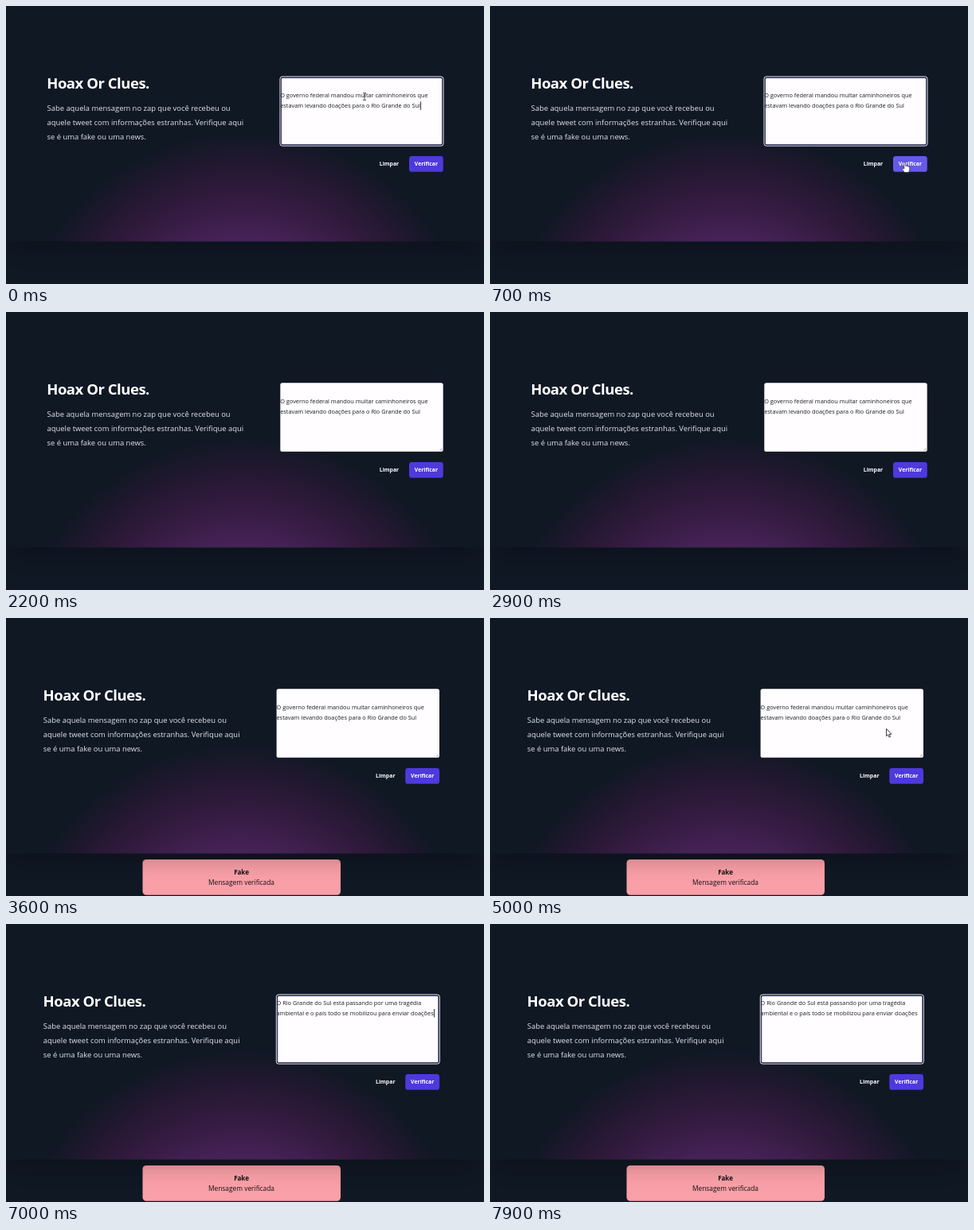
Write an HTML page that moves like this. It is 600x350 px and loops after 8000 ms.

```html
<!DOCTYPE html>
<html lang="pt">
<head>
<meta charset="utf-8">
<title>Verificador de mensagens</title>
<style>
  html, body { margin: 0; height: 100%; overflow: hidden; background: #101824; }
  svg { display: block; width: 600px; height: 350px; font-family: "Open Sans", "Noto Sans", sans-serif; }
  .title { font-size: 18.5px; font-weight: 700; letter-spacing: -.025em; fill: #fff; }
  .lead { font-size: 9.42px; fill: #e2e5ea; }
  .button { font-size: 6.9px; font-weight: 700; fill: #fff; }
  .message { font-size: 7.36px; fill: #1a1d26; }
  .selected { fill: #f4f6ff; }
  .card { font-size: 8.37px; text-anchor: middle; fill: #111; }
  .shadow { filter: blur(14px); opacity: .25; }
</style>
</head>
<body>
<svg viewBox="0 0 600 350">
  <defs>
    <radialGradient id="glow" gradientUnits="userSpaceOnUse" cx="300" cy="446" r="288">
      <stop offset="0" stop-color="#7775d6" stop-opacity=".7"/>
      <stop offset=".5" stop-color="#b13cc4" stop-opacity=".35"/>
      <stop offset=".75" stop-color="#c022a8" stop-opacity=".175"/>
      <stop offset="1" stop-color="#d808a0" stop-opacity="0"/>
    </radialGradient>
    <clipPath id="below"><rect x="-20" y="296.4" width="640" height="54"/></clipPath>
    <clipPath id="selection"><rect/><rect/></clipPath>
  </defs>

  <g id="card" class="card">
    <rect x="171.5" y="304" width="248.5" height="44.7" rx="4.5" fill="#f99fa7"/>
    <text x="295.5" y="323" font-weight="700" font-size="8">Fake</text>
    <text x="295.5" y="336.3">Mensagem verificada</text>
  </g>

  <g id="page">
    <g clip-path="url(#below)"><rect class="shadow" x="7" y="30" width="586" height="274"/></g>
    <path d="M0 150H600V296.4H0z" fill="url(#glow)"/>

    <text class="title" x="51.2" y="104">Hoax Or Clues.</text>
    <g class="lead">
      <text x="51.5" y="132.4">Sabe aquela mensagem no zap que você recebeu ou</text>
      <text x="51.5" y="150.3">aquele tweet com informações estranhas. Verifique aqui</text>
      <text x="51.5" y="168.2">se é uma fake ou uma news.</text>
    </g>

    <g id="idle">
      <rect x="344.3" y="89.2" width="204.4" height="86.6" rx="2.6" fill="#fffdff"/>
      <path d="M544.5 174.5l3-3M546.3 174.7l1.4-1.4" stroke="#777" stroke-width=".6"/>
    </g>
    <g id="focus">
      <rect x="344" y="88.9" width="205" height="87.2" rx="2.8" fill="#111825" stroke="#fff" stroke-width=".9"/>
      <rect x="345.5" y="90.4" width="202" height="84.2" rx="1.6" fill="#fffdff" stroke="#29276b" stroke-width=".8"/>
    </g>

    <g class="message">
      <text x="344.2"></text>
      <text x="344.2"></text>
    </g>
    <g clip-path="url(#selection)">
      <path d="M340 100H550V140H340z" fill="#3c62d2"/>
      <g class="message">
        <text class="selected" x="344.2"></text>
        <text class="selected" x="344.2"></text>
      </g>
    </g>
    <rect id="caret" width=".9" height="10.5" fill="#222"/>

    <text class="button" x="468.8" y="201.4">Limpar</text>
    <rect id="verify" x="506" y="189" width="42.8" height="19.8" rx="3.4"/>
    <text class="button" x="512.8" y="201.4">Verificar</text>
  </g>

  <g id="cursor">
    <path id="beam" d="M-2-4.5h1.5l.5.5.5-.5H2M0-4V4M-2 4.5h1.5L0 4l.5.5H2" fill="none" stroke="#222" stroke-width=".8"/>
    <path id="arrow" d="M0 0V9.2L2.1 7.3 3.6 10.7 5.1 10 3.6 6.8H6.5z" fill="#fff" stroke="#111" stroke-width=".8"/>
    <path id="hand" d="M-1 1Q0-.8 1 1V5Q2.2 4 3 5.4 4.2 4.6 4.8 6 6 5.5 6 7V9.5L4.8 13H-.4L-3.8 8.6Q-3.6 6.8-1 8.6z" fill="#fff" stroke="#222" stroke-width=".7"/>
  </g>
</svg>
<script>
const LOOP = 8000, CLICK = 1900, RESULT = 3200, DRAG = 5500, DROP = 6100, PASTE = 7000;
const LEFT = 344.2, ROW = 13.3, FIRST_ROW = 101.7, SHIFT = -4.7;
const claims = [
  ["O governo federal mandou multar caminhoneiros que", "estavam levando doações para o Rio Grande do Sul"],
  ["O Rio Grande do Sul está passando por uma tragédia", "ambiental e o país todo se mobilizou para enviar doações"]
];
// time, x, y
const path = [
  [0, 450, 114], [300, 450, 114], [800, 529, 206], [1100, 531.5, 202.5],
  [4200, 531, 190], [4700, 497.5, 139.5], [5100, 497.5, 139.5],
  [DRAG, 516, 127], [DROP, 352, 101.5], [LOOP, 352, 101.5]
];

const $ = id => document.getElementById(id);
const show = (id, on) => $(id).style.display = on ? "" : "none";
const texts = [...document.querySelectorAll(".message text")];
const marks = document.querySelectorAll("#selection rect");

function place(el, attrs) {
  for (const key in attrs) el.setAttribute(key, attrs[key]);
}

function pointer(t) {
  const i = Math.max(1, path.findIndex(p => p[0] > t));
  const [a, b] = [path[i - 1], path[i]];
  const u = (t - a[0]) / (b[0] - a[0]), e = u * u * (3 - 2 * u);
  return [a[1] + (b[1] - a[1]) * e, a[2] + (b[2] - a[2]) * e];
}

function draw(t) {
  const [x, y] = pointer(t);
  const shifted = t >= RESULT, pasted = t >= PASTE, dx = shifted ? SHIFT : 0;
  const focused = t < CLICK || t >= DRAG;
  const hover = t < CLICK && y > 189;
  const beam = t >= DRAG || (t < CLICK && y < 176);
  const top = FIRST_ROW + (pasted ? 0 : ROW);

  show("card", shifted);
  place($("page"), { transform: `translate(${dx} 0)` });
  show("focus", focused);
  show("idle", !focused);
  $("verify").setAttribute("fill", hover ? "#6559e8" : "#4e39dc");

  texts.forEach((el, i) => {
    el.textContent = claims[+pasted][i % 2];
    place(el, { y: top + ROW * (i % 2) });
  });

  const ends = [0, 1].map(i => LEFT + texts[i].getComputedTextLength());
  marks.forEach((mark, i) => {
    const rowTop = top - 9.1 + ROW * i;
    const end = ends[i] + (i ? 0 : 3.5);
    const start = y < rowTop ? LEFT - .4 : y < rowTop + ROW ? x - dx : end;
    const on = t >= DRAG && !pasted;
    place(mark, { x: start, y: rowTop, width: on ? Math.max(0, end - start) : 0, height: ROW });
  });

  const blink = Math.floor((t - (pasted ? PASTE : 0)) / 500) % 2 === 0;
  show("caret", blink && (t < CLICK || pasted));
  place($("caret"), { x: ends[1] + .3, y: top + ROW - 8 });

  show("cursor", t < CLICK + 100 || (t >= 4200 && !pasted));
  place($("cursor"), { transform: `translate(${x} ${y})` });
  show("beam", beam);
  show("hand", hover);
  show("arrow", !beam && !hover);
}

function tick() {
  draw(Math.floor(performance.now() % LOOP / 100) * 100);
  requestAnimationFrame(tick);
}
tick();
</script>
</body>
</html>
```
